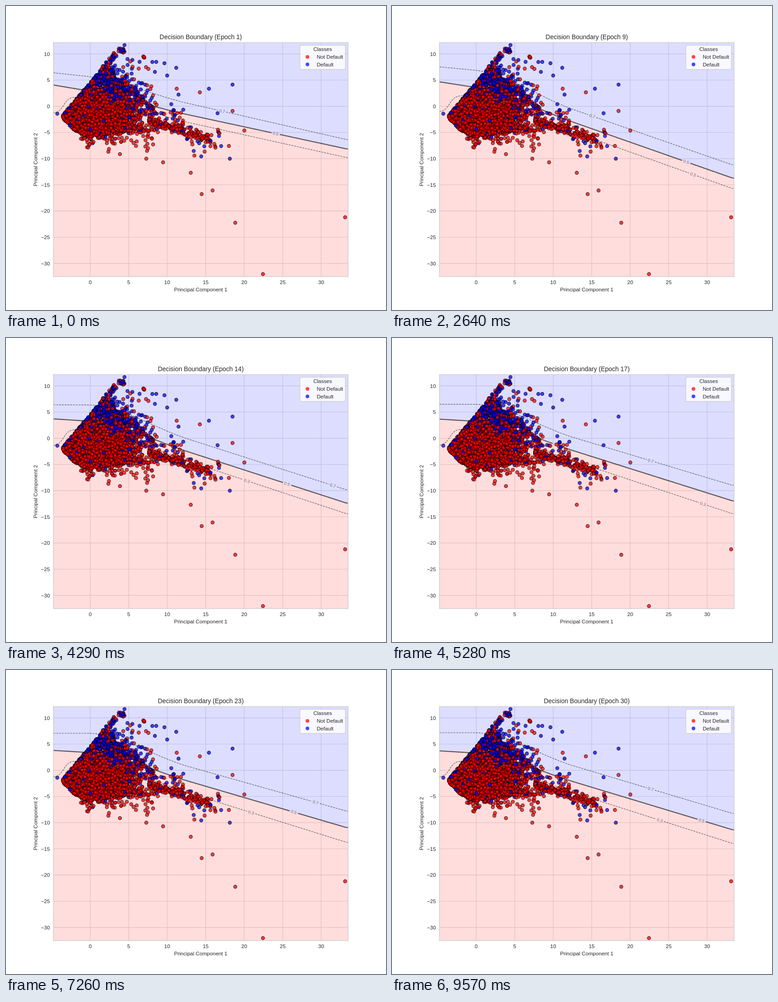
Recreate the animation shown at these times as an HTML page with a canvas. Size 837 by 669 pixels, loop 9900 ms.

```html
<!DOCTYPE html>
<html lang="en">
<head>
<meta charset="utf-8">
<title>Decision Boundary</title>
<style>
  html, body { margin: 0; width: 100%; height: 100%; overflow: hidden; background: #fff; }
  canvas { display: block; }
</style>
</head>
<body>
<canvas id="stage" width="837" height="669"></canvas>
<script>
const W = 837, H = 669, STEP = 330, EPOCHS = 30;
const LEFT = 104.5, TOP = 80.5, RIGHT = 753.5, BOTTOM = 595.5;
const FONT = '"Liberation Sans", Arial, sans-serif';
const RED = '#f00', BLUE = '#00f', INK = '#262626';
const px = v => 185.5 + v * 16.957;
const py = v => 220.6 - v * 11.525;

const STYLES = [
  { text: '0.7', dash: [4.3, 1.86], width: 1.16, drop: 0, dip: 0 },
  { text: '0.5', dash: [], width: 2.32, drop: 4.5, dip: 0 },
  { text: '0.3', dash: [4.3, 1.86], width: 1.16, drop: 2, dip: 37 }
];
// Epoch, then for each contour: left, middle and right height, label x
const KEYS = [
  [1, [147, 214, 293.5, 476], [174, 239, 314, 594], [199, 256, 333, 385]],
  [5, [146, 213, 284, 715], [173, 236, 305.5, 483], [199, 252, 322, 690]],
  [9, [134, 228, 349, 441], [167, 256, 378, 648], [196, 277, 401, 663]],
  [14, [147, 222, 333.5, 720], [178, 250, 362.7, 619], [200, 271, 386, 531]],
  [19, [145, 217, 317, 570], [179, 247, 354.5, 363], [199, 271, 386, 685]],
  [26, [135, 208, 304.5, 682], [175.5, 242, 340, 634], [199, 269, 373, 540]],
  [30, [138, 211, 315, 570], [178, 246, 351, 682], [199, 270, 381, 590]]
];

// Far points that stand alone, as [x, y]
const LONE_RED = [[376, 182], [427, 190], [499, 231], [525, 274], [491, 308], [407, 367],
  [431, 414], [455, 406], [505, 477], [566, 590], [747, 465], [346, 344], [309, 336], [251, 326]];
const LONE_BLUE = [[261, 86], [331, 123], [349, 126], [375, 136], [328, 145], [355, 153],
  [499, 173], [447, 182], [380, 195], [466, 236], [430, 331], [493, 336], [113, 237], [191, 302]];

// Outline of the dense cloud
const ROOF = [[124, 241], [217, 131], [250, 172], [300, 207], [345, 250]];
const FLOOR = [[124, 246], [150, 273], [182, 288], [270, 272], [345, 266]];

let seed = 20;
function random() {
  seed = (seed + 0x6D2B79F5) | 0;
  let t = Math.imul(seed ^ (seed >>> 15), 1 | seed);
  t = (t + Math.imul(t ^ (t >>> 7), 61 | t)) ^ t;
  return ((t ^ (t >>> 14)) >>> 0) / 4294967296;
}
const mix = (a, b, t) => a + (b - a) * t;
const between = (a, b) => mix(a, b, random());
const gauss = () => random() + random() + random() + random() - 2;
const fringe = size => Math.min(-Math.log(1 - random()) * size, size * 3);
const sigmoid = v => 1 / (1 + Math.exp(-v));

function linear(points, x) {
  let i = 1;
  while (i < points.length - 1 && x > points[i][0]) i++;
  const [x0, y0] = points[i - 1], [x1, y1] = points[i];
  return mix(y0, y1, (x - x0) / (x1 - x0));
}

function layer(paint) {
  const canvas = document.createElement('canvas');
  canvas.width = W;
  canvas.height = H;
  paint(canvas.getContext('2d'));
  return canvas;
}

function dot(c, x, y, color, outlined = true) {
  c.globalAlpha = 0.72;
  c.beginPath();
  c.arc(x, y, outlined ? 3.7 : 4, 0, Math.PI * 2);
  c.fillStyle = color;
  c.fill();
  c.strokeStyle = '#000';
  c.lineWidth = 1.16;
  if (outlined) c.stroke();
  c.globalAlpha = 1;
}

function text(c, str, x, y, size = 11.6, align = 'center') {
  c.font = `${size}px ${FONT}`;
  c.textAlign = align;
  c.fillText(str, x, y);
}

function paintCloud(c) {
  const scatter = (count, blueChance, place) => {
    for (let i = 0; i < count; i++) {
      const [x, y] = place();
      const chance = typeof blueChance === 'function' ? blueChance(x, y) : blueChance;
      dot(c, x, y, random() < chance ? BLUE : RED);
    }
  };
  const blueInBody = (x, y) => {
    const chance = 0.06 + 0.66 * sigmoid((184 + (x - 180) * 0.28 - y) / 8);
    return x < 200 && y < linear(ROOF, x) + 5 ? Math.max(chance, 0.4) : chance;
  };

  LONE_RED.forEach(([x, y]) => dot(c, x, y, RED));
  LONE_BLUE.forEach(([x, y]) => dot(c, x, y, BLUE));
  // Sparse surroundings: upper right, far right, below
  scatter(20, 0.45, () => [between(258, 325), between(103, 185)]);
  scatter(24, 0.35, () => [between(395, 477), 295 + gauss() * 26]);
  scatter(18, 0.03, () => [between(210, 330), between(290, 322)]);
  // Rims of the body
  scatter(110, 0.07, () => {
    const x = between(165, 335);
    return [x, linear(FLOOR, x) + fringe(8)];
  });
  scatter(135, 0.6, () => {
    const x = between(225, 325);
    return [x, linear(ROOF, x) - fringe(11)];
  });
  scatter(45, 0.35, () => {
    const x = between(315, 398);
    return [x, 236 + (x - 315) * 0.2 + gauss() * 22];
  });
  // Tail to the lower right
  scatter(190, 0.13, () => {
    const x = mix(315, 453, Math.pow(random(), 1.4));
    return [x, 252 + (x - 315) * 0.32 + gauss() * 9];
  });
  // Dense body, thinning out to the right
  scatter(3000, blueInBody, () => {
    const x = mix(125, 340, (random() + random() * random()) / 2);
    return [x, between(linear(ROOF, x), linear(FLOOR, x))];
  });
  // Ridge and small clusters at the peak
  scatter(18, 0.75, () => {
    const t = random();
    return [214 + t * 30 + gauss() * 3, 137 - t * 36 + gauss() * 5];
  });
  scatter(12, 0.85, () => [237 + gauss() * 3, 110 + gauss() * 5]);
  scatter(18, 0.6, () => [between(247, 265), 98 + gauss() * 4]);
  scatter(4, 0, () => [303.5 + gauss(), 111.5 + gauss() * 2]);
}

function paintGrid(c) {
  c.fillStyle = '#fff';
  c.fillRect(0, 0, W, H);
  c.strokeStyle = '#ccc';
  c.lineWidth = 1.16;
  c.beginPath();
  for (let v = 0; v <= 30; v += 5) {
    c.moveTo(px(v), TOP);
    c.lineTo(px(v), BOTTOM);
  }
  for (let v = -30; v <= 10; v += 5) {
    c.moveTo(LEFT, py(v));
    c.lineTo(RIGHT, py(v));
  }
  c.stroke();
}

function paintFront(c) {
  paintCloud(c);
  c.strokeStyle = '#ccc';
  c.lineWidth = 1.4;
  c.strokeRect(LEFT, TOP, RIGHT - LEFT, BOTTOM - TOP);

  c.fillStyle = 'rgba(255,255,255,.8)';
  c.lineWidth = 1.16;
  c.beginPath();
  c.roundRect(647.5, 86.3, 100, 53.4, 2.5);
  c.fill();
  c.stroke();
  dot(c, 664, 112, RED, false);
  dot(c, 664, 128.5, BLUE, false);

  c.fillStyle = INK;
  text(c, 'Classes', 697.5, 99.3);
  text(c, 'Not Default', 684.5, 116, 11.6, 'left');
  text(c, 'Default', 684.5, 132.5, 11.6, 'left');
  for (let v = 0; v <= 30; v += 5) text(c, v, px(v), 612);
  for (let v = -30; v <= 10; v += 5) {
    text(c, String(v).replace('-', '\u2212'), 96.7, py(v) + 4.2, 11.6, 'right');
  }
  text(c, 'Principal Component 1', 428.8, 627.5);
  c.save();
  c.translate(69, 338);
  c.rotate(-Math.PI / 2);
  text(c, 'Principal Component 2', 0, 0);
  c.restore();
}

// Gentle start, cubic bend from x = 180 to 400, then straight
function contourAt(style, index, epoch) {
  let k = KEYS.length - 2;
  while (KEYS[k][0] > epoch) k--;
  const a = KEYS[k], b = KEYS[k + 1];
  const t = (epoch - a[0]) / (b[0] - a[0]);
  const [left, middle, right] = a[index].map((v, i) => mix(v, b[index][i], t));
  const drop = style.drop + (style.dip ? 0 : 8 * sigmoid(11 - epoch));
  const startSlope = drop / 75, endSlope = (right - middle) / 348;

  const y = x => {
    if (x > 748) return right + (x - 748) * 0.15;
    if (x > 400) return middle + (x - 400) * endSlope;
    const dip = style.dip * sigmoid((127 - x) / 6);
    if (x < 180) return left + (x - 105) * startSlope + dip;
    const s = (x - 180) / 220, r = 1 - s;
    return r * r * (1 + 2 * s) * (left + drop) + s * s * (3 - 2 * s) * middle
      + 220 * s * r * (r * startSlope - s * endSlope) + dip;
  };
  return { ...style, y, labelX: (t < 0.5 ? a : b)[index][3] };
}

function tracePath(c, y, from, to) {
  c.moveTo(from, y(from));
  for (let x = from + 2; x < to; x += 2) c.lineTo(x, y(x));
  c.lineTo(to, y(to));
}

function drawRegions(c, y) {
  c.globalAlpha = 0.4;
  for (const [color, edge] of [['#aaf', TOP], ['#faa', BOTTOM]]) {
    c.beginPath();
    tracePath(c, y, LEFT, RIGHT);
    c.lineTo(RIGHT, edge);
    c.lineTo(LEFT, edge);
    c.fillStyle = color;
    c.fill();
  }
  c.globalAlpha = 1;
}

function drawContour(c, { text: label, dash, width, y, labelX }) {
  c.strokeStyle = 'rgba(0,0,0,.6)';
  c.lineWidth = width;
  c.setLineDash(dash);
  for (const [from, to] of [[LEFT, labelX - 9], [labelX + 9, RIGHT]]) {
    c.beginPath();
    tracePath(c, y, from, to);
    c.stroke();
  }
  c.setLineDash([]);
  c.save();
  c.translate(labelX, y(labelX));
  c.rotate(Math.atan2(y(labelX + 8) - y(labelX - 8), 16));
  c.fillStyle = 'rgba(0,0,0,.52)';
  text(c, label, 0, 3.3, 9.3);
  c.restore();
}

const ctx = document.getElementById('stage').getContext('2d');
const grid = layer(paintGrid), front = layer(paintFront);
let shown = 0;

function draw(epoch) {
  const contours = STYLES.map((style, i) => contourAt(style, i + 1, epoch));
  ctx.drawImage(grid, 0, 0);
  drawRegions(ctx, contours[1].y);
  contours.forEach(contour => drawContour(ctx, contour));
  ctx.drawImage(front, 0, 0);
  ctx.fillStyle = INK;
  text(ctx, `Decision Boundary (Epoch ${epoch})`, 429, 73.3, 13.95);
}

function tick() {
  const epoch = 1 + Math.floor(performance.now() / STEP) % EPOCHS;
  if (epoch !== shown) draw(shown = epoch);
  requestAnimationFrame(tick);
}
tick();
</script>
</body>
</html>
```
